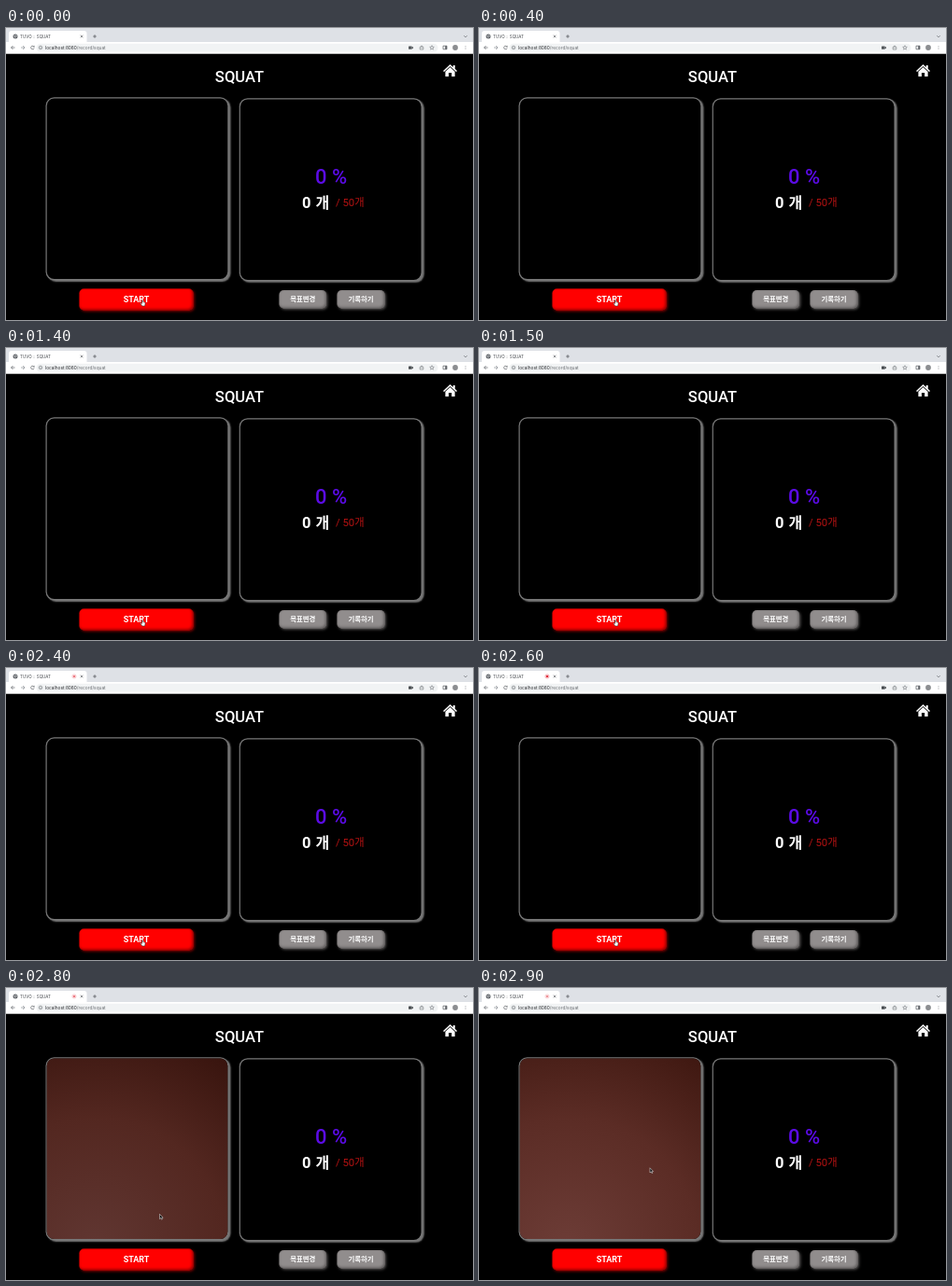
An HTML page with a canvas for the animation above (3000 ms loop, 500x313 px).

```html
<!DOCTYPE html>
<html lang="ko">
<head>
<meta charset="utf-8">
<title>Squat counter</title>
<style>
html, body { margin: 0; width: 100%; height: 100%; overflow: hidden; background: #000; }
canvas { display: block; width: 500px; height: 313px; }
</style>
</head>
<body>
<canvas id="stage"></canvas>
<script>
const W = 500, H = 313, LOOP = 3000, STEP = 100;
const LATIN = 'Roboto, "Noto Sans CJK KR", "Noto Sans CJK", sans-serif';
const KOREAN = '"Noto Sans CJK KR", "Noto Sans CJK", "Noto Sans", sans-serif';
const UI = 'Inter, Roboto, sans-serif';
const canvas = document.getElementById('stage');
const ctx = canvas.getContext('2d');
const scale = window.devicePixelRatio || 1;
canvas.width = Math.round(W * scale);
canvas.height = Math.round(H * scale);

const mix = (a, b, k) => a + (b - a) * k;
const clamp = k => Math.max(0, Math.min(1, k));
const rgb = (a, b, k) => `rgb(${a.map((v, i) => Math.round(mix(v, b[i], k))).join()})`;

function rect(x, y, w, h, color) {
  ctx.fillStyle = color;
  ctx.fillRect(x, y, w, h);
}

function roundPath(x, y, w, h, r) {
  ctx.beginPath();
  ctx.roundRect(x, y, w, h, r);
}

function fillRound(x, y, w, h, r, color) {
  roundPath(x, y, w, h, r);
  ctx.fillStyle = color;
  ctx.fill();
}

function dot(x, y, r, color) {
  ctx.beginPath();
  ctx.arc(x, y, r, 0, Math.PI * 2);
  ctx.fillStyle = color;
  ctx.fill();
}

function ring(x, y, r, color, width, from = 0, to = Math.PI * 2) {
  ctx.beginPath();
  ctx.arc(x, y, r, from, to);
  ctx.strokeStyle = color;
  ctx.lineWidth = width;
  ctx.stroke();
}

// Path data is placed relative to x, y.
function shape(data, x, y, fill, stroke, width = 0.7) {
  const path = new Path2D(data);
  ctx.save();
  ctx.translate(x, y);
  if (fill) { ctx.fillStyle = fill; ctx.fill(path); }
  if (stroke) { ctx.strokeStyle = stroke; ctx.lineWidth = width; ctx.stroke(path); }
  ctx.restore();
}

function text(str, x, y, size, weight, color, family = LATIN, align = 'left') {
  ctx.font = `${weight} ${size}px ${family}`;
  ctx.textAlign = align;
  ctx.fillStyle = color;
  ctx.fillText(str, x, y);
  return ctx.measureText(str).width;
}

function shadow(color, blur, dx, dy) {
  ctx.shadowColor = color;
  ctx.shadowBlur = blur * scale;
  ctx.shadowOffsetX = dx * scale;
  ctx.shadowOffsetY = dy * scale;
}

function drawTabs(t) {
  rect(0, 0, W, 15.5, '#dee1e6');
  fillRound(3, 3, 83.5, 14, [3, 3, 0, 0], '#fff');
  dot(10, 9, 2.5, '#5f6368');
  shape('M-1.6 -.8L0 -.1L-.4 1.6M.7 -1.6L1.6 .3', 10, 9, null, '#fff', 0.6);
  text('TUVO :: SQUAT', 15, 10.8, 4.5, 400, '#45494d', UI);
  shape('M-1.3 -1.3L1.3 1.3M1.3 -1.3L-1.3 1.3', 81, 9, null, '#4c5054', 0.6);
  shape('M-1.8 0H1.8M0 -1.8V1.8', 95, 9, null, '#4c5054', 0.7);
  shape('M-1.7 -.8L0 .9L1.7 -.8', 492, 9, null, '#5f6368', 0.7);
  if (t >= 2400) {
    const glow = 0.75 + 0.25 * Math.cos((t - 2600) / 200 * Math.PI / 1.5);
    ctx.globalAlpha = glow;
    dot(73, 9, 1.35, '#e02f3c');
    ring(73, 9, 2.1, '#ec6f79', 0.55);
    ctx.globalAlpha = 1;
  }
}

function drawToolbar(t) {
  const ink = '#5f6368';
  rect(0, 15, W, 12.7, '#fff');
  fillRound(32.5, 16.7, 430, 8.9, 4.4, '#f1f3f4');
  shape('M2 0H-2M0 -2L-2 0L0 2', 7.5, 21, null, ink);
  shape('M-2 0H2M0 -2L2 0L0 2', 18, 21, null, '#898d92');
  ring(28.5, 21, 1.8, ink, 0.7, 0.3, 5.5);
  shape('M2 -2.2V-.4H.2Z', 28.5, 21, ink);
  ring(37, 21, 1.8, ink, 0.55);
  shape('M0 -.2V1M0 -1V-.6', 37, 21, null, ink, 0.55);
  const host = text('localhost:8080', 42, 22.8, 4.8, 400, '#282a2d', UI);
  text('/record/squat', 42 + host, 22.8, 4.8, 400, '#686c70', UI);

  const cam = t < 800 ? '#54585c' : '#484c50';
  fillRound(431, 19.4, 3.7, 3.4, 0.5, cam);
  shape('M3.7 1.3L5 .5V2.9L3.7 2.1Z', 431, 19.4, cam);
  shape('M-1 -.7H-1.8V2H1.8V-.7H1M0 .8V-2M-1 -1.1L0 -2.1L1 -1.1', 445, 21, null, ink, 0.55);
  shape('M0 -2.3L.7 -.7L2.3 -.6L1 .5L1.4 2.1L0 1.2L-1.4 2.1L-1 .5L-2.3 -.6L-.7 -.7Z', 456, 21, null, ink, 0.5);
  shape('M-2 -1.8H2V1.8H-2Z', 470, 21, null, ink, 0.75);
  rect(470.2, 19.2, 1.8, 3.6, ink);
  dot(481, 21, 2.9, '#8b8d90');
  for (const dy of [-1.6, 0, 1.6]) dot(492, 21 + dy, 0.45, ink);
}

function drawPanel(x, y) {
  ctx.save();
  shadow('#777', 1.5, 2, 1.6);
  fillRound(x, y, 196, 196, 9, '#777');
  ctx.restore();
  fillRound(x + 1.2, y + 1.2, 193.6, 193.6, 8, '#000');
}

function drawCamera(x, y, t) {
  if (t < 2700) return;
  const k = clamp((t - 2700) / 200);
  const light = ctx.createRadialGradient(95, 278, 5, 95, 278, 250);
  light.addColorStop(0, rgb([84, 48, 43], [108, 60, 54], k));
  light.addColorStop(0.55, rgb([74, 33, 27], [91, 44, 37], k));
  light.addColorStop(1, rgb([47, 15, 9], [62, 23, 16], k));
  fillRound(x + 1.2, y + 1.2, 193.6, 193.6, 8, light);
}

function drawButton(x, y, w, h, color, edge, label, size, family) {
  ctx.save();
  shadow(edge, 3, 1.2, 1.2);
  fillRound(x, y, w, h, 5, color);
  ctx.restore();
  ctx.save();
  roundPath(x, y, w, h, 5);
  ctx.clip();
  shadow(edge, 3, -1, -1);
  roundPath(x - 8, y - 8, w + 16, h + 16, 8);
  ctx.roundRect(x, y, w, h, 5);
  ctx.fillStyle = edge;
  ctx.fill('evenodd');
  ctx.restore();
  text(label, x + w / 2, y + h / 2 + size * 0.32, size, 700, '#fff', family, 'center');
}

function drawHome() {
  shape('M0 7L7.5 0L10.7 3V1H12.7V4.8L15 7L14 8L7.5 2L1 8Z', 468, 39, '#fff');
  shape('M2.4 7.7L7.5 3.1L12.6 7.7V13H9.1V9H5.9V13H2.4Z', 468, 39, '#fff');
}

function drawCursor(t) {
  if (t < 2800) {
    shape('M-1 -2.7V1L-2 .2L-2.4 .9L-.7 3.4H2.1L2.7 .3L1.8 -.4L0 -.7V-2.7Z', 146.5, 294.5, '#fff', '#222', 0.5);
    return;
  }
  const k = clamp((t - 2700) / 200);
  shape('M0 0V5.2L1.2 4.1L2 5.8L2.9 5.4L2.1 3.8H3.7Z', mix(146, 183, k), mix(292, 192.8, k), '#111', '#ddd', 0.55);
}

function draw(t) {
  ctx.setTransform(scale, 0, 0, scale, 0, 0);
  rect(0, 0, W, H, '#000');
  drawTabs(t);
  drawToolbar(t);
  text('SQUAT', 250, 58, 16.6, 500, '#fff', LATIN, 'center');
  drawHome();
  drawPanel(42.5, 74.3);
  drawCamera(42.5, 74.3, t);
  drawPanel(249.7, 75.2);

  text('0 %', 348, 167, 22, 500, '#5b0be6', LATIN, 'center');
  text('0', 317, 192.5, 16.5, 700, '#fff');
  text('개', 331.5, 192.5, 16, 700, '#fff', KOREAN);
  text('/ 50개', 353, 191, 11.3, 400, '#b51212');

  drawButton(78.5, 279.5, 122, 23, '#f00', '#8c0000', 'START', 9, LATIN);
  drawButton(292.5, 281, 50.5, 19.5, '#918d8d', '#5b5858', '목표변경', 7.4, KOREAN);
  drawButton(354.5, 281, 51, 19.5, '#918d8d', '#5b5858', '기록하기', 7.4, KOREAN);
  drawCursor(t);
}

const start = performance.now();
function tick() {
  const t = (performance.now() - start) % LOOP;
  draw(Math.floor(t / STEP) * STEP);
  requestAnimationFrame(tick);
}
tick();
</script>
</body>
</html>
```
